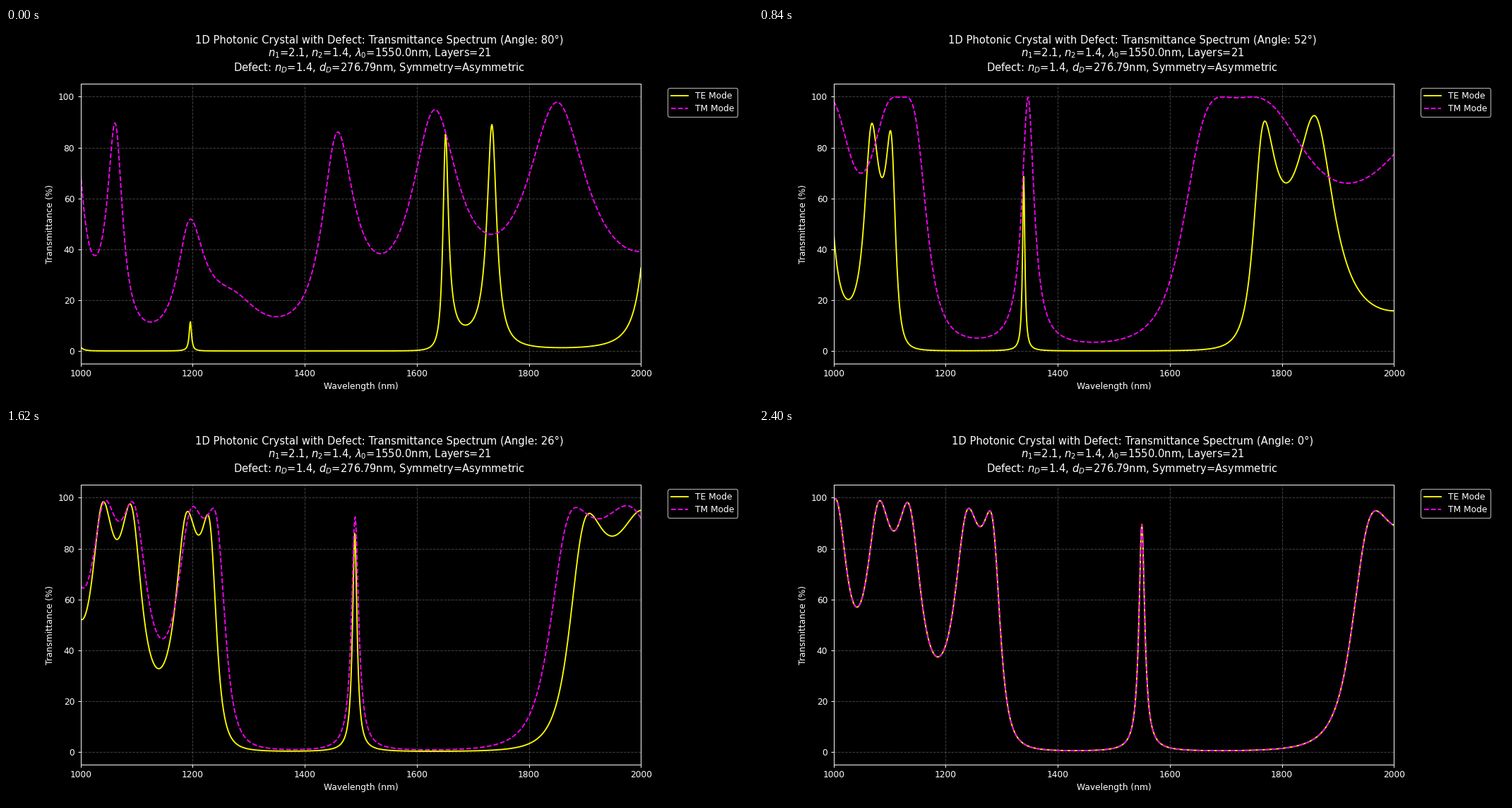
Animation, 1058 px wide and 529 px high, one loop 2.46 s. Source, as a matplotlib script:

```python
import numpy as np
import matplotlib.pyplot as plt
from matplotlib.animation import FuncAnimation

N1, N2, N_DEFECT = 2.1, 1.4, 1.4
CENTER = 1550.0
PAIRS = 5
D1, D2, D_DEFECT = (CENTER / (4 * n) for n in (N1, N2, N_DEFECT))
LAYERS = 4 * PAIRS + 1
ANGLES = range(80, -1, -2)
WAVELENGTHS = np.linspace(1000, 2000, 1001)


def layer_matrix(n, thickness, sin_in, mode):
    """Characteristic matrix of one layer for every wavelength."""
    cos_t = np.sqrt(1 - (sin_in / n) ** 2)
    eta = n * cos_t if mode == "TE" else n / cos_t
    delta = 2 * np.pi * n * thickness * cos_t / WAVELENGTHS
    c, s = np.cos(delta), 1j * np.sin(delta)
    return np.stack([c, s / eta, s * eta, c], axis=-1).reshape(-1, 2, 2)


def transmittance(angle, mode):
    """Percent transmitted through (HL)^5 D (HL)^5 in air."""
    theta = np.radians(angle)
    sin_in, cos_in = np.sin(theta), np.cos(theta)
    eta = cos_in if mode == "TE" else 1 / cos_in
    high = layer_matrix(N1, D1, sin_in, mode)
    low = layer_matrix(N2, D2, sin_in, mode)
    defect = layer_matrix(N_DEFECT, D_DEFECT, sin_in, mode)
    mirror = np.linalg.matrix_power(high @ low, PAIRS)
    m = mirror @ defect @ mirror
    total = m[:, 0, 0] + m[:, 1, 1] + m[:, 0, 1] * eta + m[:, 1, 0] / eta
    return 400 / np.abs(total) ** 2


def title_text(angle):
    return (
        f"1D Photonic Crystal with Defect: Transmittance Spectrum (Angle: {angle}°)\n"
        f"$n_1$={N1}, $n_2$={N2}, $\\lambda_0$={CENTER}nm, Layers={LAYERS}\n"
        f"Defect: $n_D$={N_DEFECT}, $d_D$={D_DEFECT:.2f}nm, Symmetry=Asymmetric"
    )


plt.style.use("dark_background")
plt.rcParams["font.family"] = "DejaVu Sans"
fig, ax = plt.subplots(figsize=(12, 6), dpi=1058 / 12)
fig.subplots_adjust(left=0.1, right=0.85, top=0.85, bottom=0.1)

title = fig.suptitle(title_text(ANGLES[0]), y=0.981, fontsize=12, linespacing=1.1)
te_line, = ax.plot([], [], color="yellow", label="TE Mode")
tm_line, = ax.plot([], [], color="magenta", linestyle="--", label="TM Mode")
ax.set(xlim=(1000, 2000), ylim=(-5, 105))
ax.set_xlabel("Wavelength (nm)", labelpad=3.7)
ax.set_ylabel("Transmittance (%)")
ax.tick_params(axis="x", pad=3)
ax.grid(True, color="gray", linestyle="--", alpha=0.5)
ax.legend(loc="upper right", bbox_to_anchor=(1.18, 1),
          labelspacing=0.43, borderpad=0.37)


def update(frame):
    angle = ANGLES[frame]
    te_line.set_data(WAVELENGTHS, transmittance(angle, "TE"))
    tm_line.set_data(WAVELENGTHS, transmittance(angle, "TM"))
    title.set_text(title_text(angle))
    return te_line, tm_line, title


anim = FuncAnimation(fig, update, frames=len(ANGLES), interval=60,
                     repeat=True, repeat_delay=0, blit=False)
plt.show()
```
